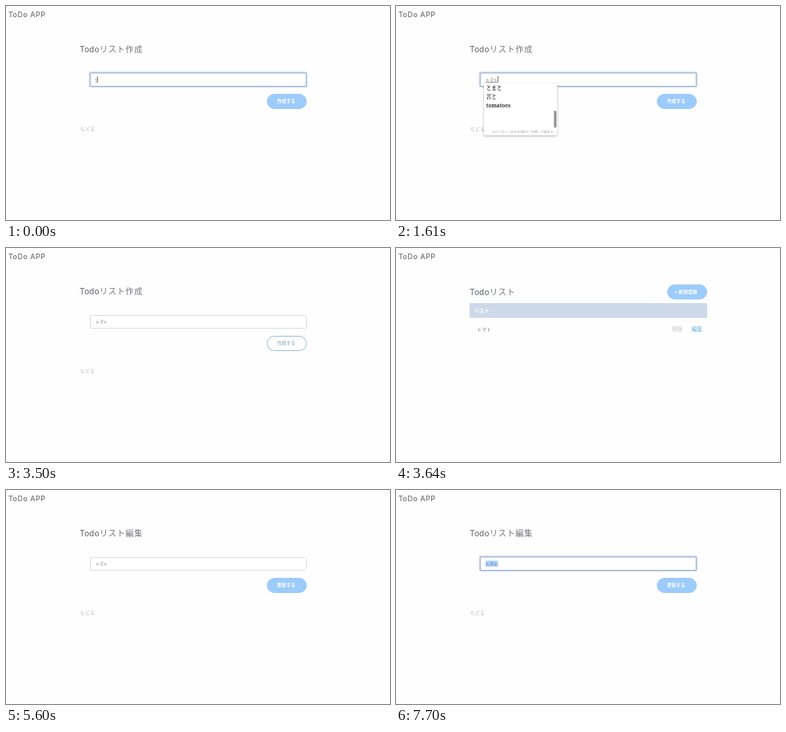
Recreate the animation shown at these times as an HTML page with a canvas. Size 480 px wide and 268 px high, loop 8 s.

```html
<!DOCTYPE html>
<html lang="ja">
<head>
<meta charset="utf-8">
<title>ToDo APP</title>
<style>
html, body { margin: 0; width: 100%; height: 100%; overflow: hidden; background: #fefefe; }
canvas { display: block; width: 480px; height: 268px; }
</style>
</head>
<body>
<canvas id="stage" width="480" height="268"></canvas>
<script>
const ctx = document.getElementById('stage').getContext('2d');
const LOOP = 8000;
const SANS = 'Inter, "Noto Sans CJK JP", "Noto Sans CJK", sans-serif';
const SERIF = '"Noto Serif", "Noto Serif CJK JP", "Noto Sans CJK JP", serif';
const BLUE = [156, 203, 252], WHITE = [255, 255, 255], EDGE = [160, 188, 222];

// Composition steps: start time, text, caret x
const typing = [
  [0, 't', 114], [140, 'と', 117], [700, 'とm', 121],
  [840, 'トマ', 122], [1120, 'トマt', 124], [1330, 'トマト', 127]
];
// Times when the button has reached each hover level
const hoverSteps = [[3150, 0.42], [3220, 0.78], [3290, 1]];

const within = (t, a, b) => t >= a && t < b;
const latest = (steps, t) => steps.filter(s => s[0] <= t).pop();
const mix = (a, b, k) => `rgb(${a.map((v, i) => Math.round(v + (b[i] - v) * k))})`;

function text(str, x, y, size, color, weight = 400, spacing = 0, family = SANS) {
  ctx.font = `${weight} ${size}px ${family}`;
  ctx.letterSpacing = spacing + 'px';
  ctx.fillStyle = color;
  ctx.fillText(str, x, y);
}

function rect(x, y, w, h, color) {
  ctx.fillStyle = color;
  ctx.fillRect(x, y, w, h);
}

function box(x, y, w, h, r, fill, stroke, line = 1) {
  ctx.beginPath();
  ctx.roundRect(x, y, w, h, r);
  if (fill) { ctx.fillStyle = fill; ctx.fill(); }
  if (stroke) { ctx.strokeStyle = stroke; ctx.lineWidth = line; ctx.stroke(); }
}

function frame() {
  rect(0, 0, 480, 268, '#f0f0f2');
  box(0, 0, 480, 268, [0, 2, 3, 2], '#fefefe');
  text('ToDo APP', 3, 14.2, 9, '#707277', 500, 0.45);
}

function heading(rest, y) {
  text('Todo', 92, y, 10, '#75777d', 500, 0.15);
  text(rest, 117, y, 10.2, '#75777d', 500, 0.6);
}

function button(label, x, y, textX, hover = 0) {
  box(x + 0.5, y + 0.5, 49, 18, 9, mix(BLUE, WHITE, hover),
    hover ? mix(EDGE, EDGE, 1) : mix(BLUE, BLUE, 1));
  text(label, textX, y + 11.3, 5.8, mix(WHITE, [164, 192, 216], hover), 700);
}

function form(title, label, focused, hover) {
  heading(title, 57.6);
  if (focused) {
    box(104.5, 83, 271.5, 18.3, 1.5, '#fff', '#d9e3f3', 2);
    box(105.3, 83.8, 270, 16.8, 1, '#fff', '#a0b4d6', 1.2);
  } else {
    box(105.5, 84.5, 270, 16, 1, '#fff', '#dcdde0');
  }
  button(label, 326, 110, 338.7, hover);
  text('もどる', 92.8, 156, 6.1, '#b9bbbf');
}

function caret(x) {
  rect(x, 88, 1, 7.5, '#777');
}

function value(str, color = '#65676c') {
  text(str, 112, 93.9, 5, color, 500);
}

function popup(words) {
  ctx.save();
  ctx.shadowColor = 'rgba(0,0,0,0.3)';
  ctx.shadowBlur = 3;
  ctx.shadowOffsetY = 1;
  box(110, 97, 91.5, 65, 2, '#fff');
  ctx.restore();
  words.forEach((w, i) => text(w, 112.8, 104.8 + i * 11.2, 6.5, '#333', 700, 0, SERIF));
  box(197.5, 131, 3, 21.5, 1.5, '#8e8e90');
  text('スペースバーまたはTabキーを押して選択', 120, 158.7, 3.85, '#96989c');
  text('※', 193.5, 158.7, 3.85, '#96989c');
}

function createPage(t) {
  const hover = latest([[0, 0], ...hoverSteps], t)[1];
  form('リスト作成', '作成する', t < 3500, hover);
  const [, str, x] = latest(typing, t);
  value(str);
  if (t < 2100) rect(112, 95.2, x - 112, 0.8, '#888');
  const hidden = within(t, 1890, 2100) || within(t, 2660, 3150) || t >= 3500;
  if (!hidden) caret(x);
  if (within(t, 420, 700)) popup(['と', '都', '戸']);
  if (within(t, 1610, 2100)) popup(['とまと', '苦と', 'tomatoes']);
}

function listPage() {
  heading('リスト', 58.6);
  button('+ 新規登録', 339, 45.5, 348);
  rect(92, 69, 297, 18.5, '#cdd8e9');
  text('リスト', 97.3, 80.7, 6.5, '#fff', 700);
  text('トマト', 101, 103.9, 6, '#808287', 500);
  text('削除', 345, 104, 6.6, '#bfc1c5', 500);
  text('編集', 369.5, 104, 6.7, '#94c3e6', 700);
}

function editPage(t) {
  form('リスト編集', '更新する', t >= 6510, 0);
  const selected = t >= 7700;
  if (selected) rect(112, 88.5, 15.5, 7.5, '#acd0f6');
  value('トマト', selected ? '#4b6f99' : undefined);
  if (within(t, 6510, 7070) || within(t, 7560, 7700)) caret(127);
}

function draw(now) {
  const t = now % LOOP;
  frame();
  if (t < 3640) createPage(t);
  else if (t < 5600) listPage();
  else editPage(t);
  requestAnimationFrame(draw);
}

requestAnimationFrame(draw);
</script>
</body>
</html>
```
